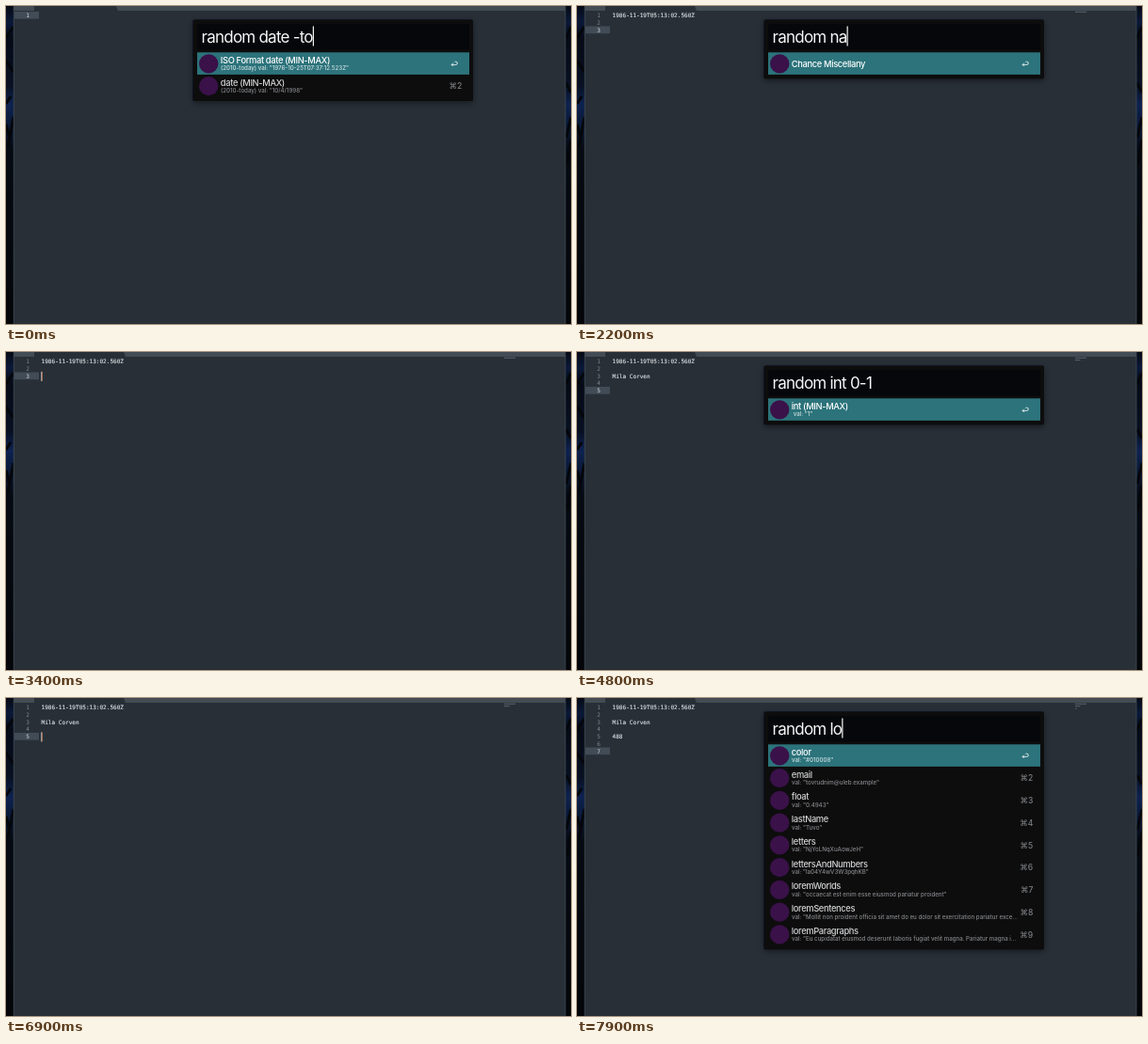
An HTML page for the animation above (8000 ms loop, 600 by 338 pixels).

```html
<!DOCTYPE html>
<html lang="en">
<head>
<meta charset="utf-8">
<title>Random values launcher</title>
<style>
  html, body { margin: 0; width: 100%; height: 100%; overflow: hidden; background: #04060a; }
  svg { display: block; width: 600px; height: 338px; }
  text { white-space: pre; }
  .code { font: 6.06px "DejaVu Sans Mono", "Liberation Mono", monospace; fill: #dde1e5; stroke: #dde1e5; stroke-width: .12; }
  .num { font: 6.06px "DejaVu Sans Mono", "Liberation Mono", monospace; fill: #7d868f; text-anchor: end; }
  .num.on { fill: #d5dade; }
  .query { font: 400 17px Inter, "Liberation Sans", sans-serif; letter-spacing: -.77px; fill: #f6f7f8; }
  .title { font: 500 9.3px Inter, "Liberation Sans", sans-serif; letter-spacing: -.34px; fill: #d2d3d5; }
  .sub { font: 500 6.15px Inter, "Liberation Sans", sans-serif; fill: #85878b; }
  .key { font: 500 8.6px Inter, "DejaVu Sans", sans-serif; fill: #7b7e82; text-anchor: end; }
  .on .title { fill: #fff; }
  .on .sub { fill: #cfe0e2; }
</style>
</head>
<body>
<svg viewBox="0 0 600 338">
  <defs>
    <linearGradient id="sky" x1="0" y1="0" x2="0" y2="1">
      <stop offset="0" stop-color="#060a14"/>
      <stop offset=".05" stop-color="#0a1838"/>
      <stop offset=".1" stop-color="#060a16"/>
      <stop offset=".25" stop-color="#081022"/>
      <stop offset=".31" stop-color="#0d2250"/>
      <stop offset=".37" stop-color="#0a1938"/>
      <stop offset=".45" stop-color="#060a12"/>
      <stop offset="1" stop-color="#040609"/>
    </linearGradient>
    <filter id="shade" x="-10%" y="-20%" width="120%" height="150%">
      <feDropShadow dx="0" dy="2" stdDeviation="3" flood-color="#000" flood-opacity=".45"/>
    </filter>
  </defs>
  <rect width="600" height="338" fill="url(#sky)"/>
  <path d="M0 34L8 22M0 58L8 70M0 104L5 96M2 150L8 118M0 126L4 140M595 34L600 22M595 82L600 92M595 140L600 118M596 168L600 142"
    fill="none" stroke="#04060a" stroke-width="3"/>
  <rect x="8" width="586" height="338" fill="#282f37"/>
  <rect x="8" width="586" height="5" fill="#434b54"/>
  <path id="tab" fill="#282f37"/>
  <path d="M8.25 0V338M594 0V338" stroke="#414c55" stroke-width=".8"/>
  <g id="editor"></g>
  <g id="panel"></g>
</svg>
<script>
const LOOP = 8000, STEP = 100;
const $ = id => document.getElementById(id);

const STAMP = '1986-11-19T05:13:02.560Z', NAME = 'Mila Corven';
const docs = [
  [0, ['']],
  [1800, [STAMP]],
  [2000, [STAMP, '', '']],
  [3500, [STAMP, '', NAME]],
  [3900, [STAMP, '', NAME, '', '']],
  [7000, [STAMP, '', NAME, '', '488']],
  [7500, [STAMP, '', NAME, '', '488', '', '']]
];

// Times when the text cursor of the editor shows
const focus = [[1500, 2000], [3300, 3900], [6800, 7500]];

const val = v => `val: "${v}"`;
const dates = (iso, day) => [
  ['ISO Format date (MIN-MAX)', '(2010-today) ' + val(iso)],
  ['date (MIN-MAX)', '(2010-today) ' + val(day)]
];
const int = v => [['int (MIN-MAX)', ' ' + val(v)]];
const start = [['Chance Miscellany']];
const names = [
  ['name', val(NAME)],
  ['firstName', val('Dalin')],
  ['lastName', val('Tuvo')]
];
const all = [
  ['color', val('#010008')],
  ['email', val('tovrudnim@uleb.example')],
  ['float', val('0.4943')],
  ['lastName', val('Tuvo')],
  ['letters', val('NjYoLNqXuAowJeH')],
  ['lettersAndNumbers', val('la04Y4wV3W3pqhKB')],
  ['loremWorlds', val('occaecat est enim esse eiusmod pariatur proident')],
  ['loremSentences', 'val: "Mollit non proident officia sit amet do eu dolor sit exercitation pariatur exce...'],
  ['loremParagraphs', 'val: "Eu cupidatat eiusmod deserunt laboris fugiat velit magna. Pariatur magna i...']
];

// Time, query, rows; no query means the launcher is closed
const inputs = [
  [0, 'random date -to', dates('1976-10-25T07:37:12.523Z', '10/4/1998')],
  [200, 'random date -tod', dates('1994-03-08T16:20:41.107Z', '6/21/1985')],
  [400, 'random date -toda', dates('2003-08-14T02:54:36.918Z', '11/9/2001')],
  [600, 'random date -today', dates(STAMP, '2/7/1978')],
  [1700],
  [2000, 'random', start],
  [2200, 'random na', start],
  [2300, 'random na', all],
  [2500, 'random nam', names],
  [2600, 'random name', names],
  [3400],
  [3900, 'random', start],
  [4300, 'random int 0-1', int('1')],
  [5400, 'random int 0-10', int('7')],
  [5500, 'random int 0-100', int('52')],
  [5600, 'random int 0-1000', int('488')],
  [6900],
  [7500, 'random', start],
  [7900, 'random lo', all]
];

const latest = (table, t) => table.filter(e => e[0] <= t).pop();
const clamp = x => Math.max(0, Math.min(1, x));
const rect = (x, y, w, h, fill, more = '') =>
  `<rect x="${x}" y="${y}" width="${w}" height="${h}" fill="${fill}" ${more}/>`;
const text = (cls, x, y, s) => `<text class="${cls}" x="${x}" y="${y}">${s}</text>`;

function drawEditor(lines, focused) {
  let out = '';
  lines.forEach((s, i) => {
    const mid = 9.9 + i * 7.75, last = i === lines.length - 1;
    if (last) out += rect(9, mid - 3.9, 26, 7.7, '#414c57');
    out += text(last ? 'num on' : 'num', 25, mid + 2.2, i + 1);
    if (s) {
      out += text('code', 37.6, mid + 2.2, s);
      out += rect(529, 5.8 + i * 1.25, s.length / 2, .8, '#68727b');
    }
    if (last && focused) {
      const x = 37.4 + s.length * 3.65;
      out += rect(x, mid - 4.5, .6, 10, '#e8e8e8') + rect(x + .6, mid - 4.5, .7, 10, '#d98a5c');
    }
  });
  $('editor').innerHTML = out;
  const end = lines[0] ? 126 : 118;
  $('tab').setAttribute('d', `M30 0H${end - 1}L${end + 1} 5H30Z`);
}

function drawRow([title, sub], i) {
  const y = 49 + i * 23.75, first = !i;
  return `<g class="${first ? 'on' : ''}">` +
    (first ? rect(203, y + .3, 289, 23.6, '#2c737b') : '') +
    `<circle cx="215.2" cy="${y + 12.4}" r="10.2" fill="#3a1149"/>` +
    text('title', 227.8, y + (sub ? 11.9 : 15.6), title) +
    (sub ? text('sub', 228, y + 19.3, sub) : '') +
    (first
      ? `<path d="M476.5 ${y + 10.2}h1.2a1.6 1.6 0 0 1 0 3.2h-4.6m1.7-1.7l-1.7 1.7l1.7 1.7" fill="none" stroke="#eef4f5" stroke-width=".9"/>`
      : text('key', 484.3, y + 15.6, '⌘' + (i + 1))) +
    '</g>';
}

function drawPanel(query, rows) {
  if (!query) { $('panel').innerHTML = ''; return; }
  const h = 39 + rows.length * 23.75;
  $('panel').innerHTML =
    rect(198.5, 14.5, 297.5, h, '#0a0c0f', 'rx="1.5" filter="url(#shade)"') +
    rect(203, 19, 289, 27.5, '#05070a') +
    text('query', 207.6, 38.8, query) +
    rows.map(drawRow).join('') +
    rect(0, 21.5, 1.2, 21, '#f4f4f4', 'id="caret"');
  const width = document.querySelector('.query').getComputedTextLength();
  $('caret').setAttribute('x', 207.6 + width);
}

// Solid after a key, then fading out and in once a second
function blink(age) {
  const p = age % 1000;
  return p < 650 ? clamp((500 - p) / 200) : clamp((p - 800) / 200);
}

let shownDoc = '', shownInput;
function render(time) {
  const t = Math.floor(time % LOOP / STEP) * STEP;
  const lines = latest(docs, t)[1];
  const focused = focus.some(([a, b]) => t >= a && t < b);
  const key = lines.length + lines.join() + focused;
  if (key !== shownDoc) drawEditor(lines, focused);
  shownDoc = key;

  const input = latest(inputs, t);
  if (input !== shownInput) drawPanel(input[1], input[2]);
  shownInput = input;
  if (input[1]) $('caret').setAttribute('opacity', blink(t - input[0]));
}

const begin = performance.now();
function tick() {
  render(performance.now() - begin);
  requestAnimationFrame(tick);
}
tick();
</script>
</body>
</html>
```
